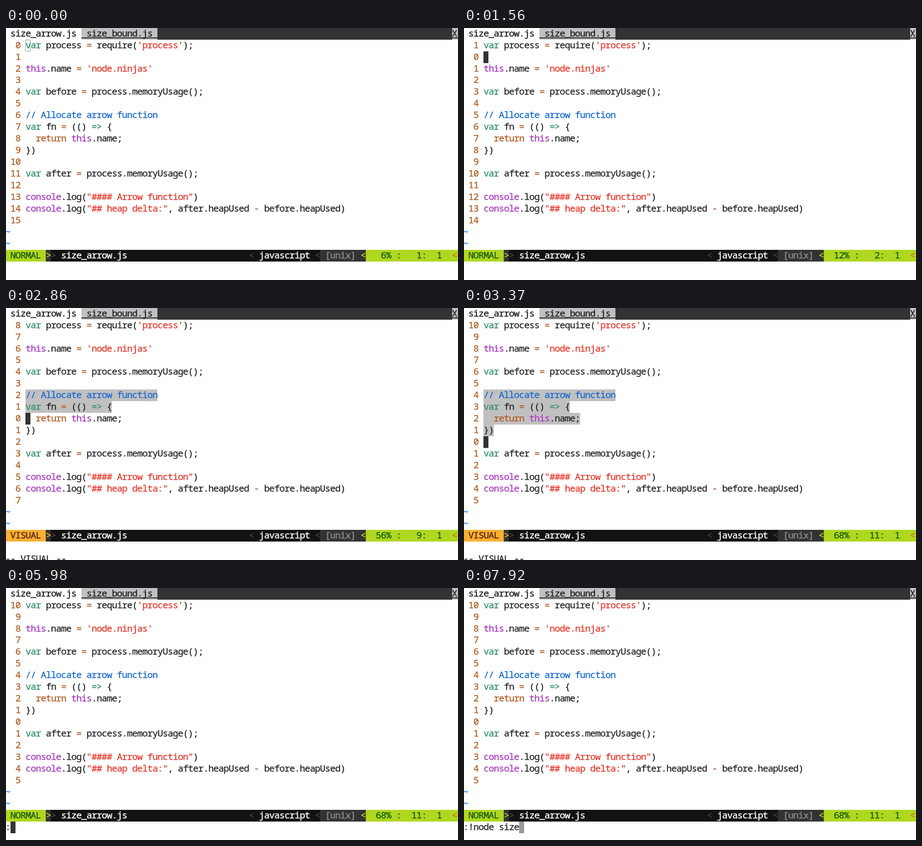
Animation, 1000 px wide and 560 px high, one loop 8 s. Source, as an HTML page:

```html
<!DOCTYPE html>
<html lang="en">
<head>
<meta charset="utf-8">
<title>Editor session</title>
<style>
  html, body { margin: 0; width: 100%; height: 100%; overflow: hidden; background: #fff; }
  #stage {
    position: relative; width: 1000px; height: 560px; overflow: hidden;
    font: 20.5px/22px "Noto Sans Mono", "DejaVu Sans Mono", monospace;
    letter-spacing: calc(11.23px - 1ch);
    -webkit-text-stroke: 0.3px;
    color: #222;
  }
  #stage div { position: absolute; height: 26px; white-space: pre; }
  .kw { color: #2f8f63; }
  .id { color: #a838c4; }
  .str { color: #e8372a; }
  .op, .num { color: #b05a1e; }
  .note { color: #1468d2; }
  .tilde { color: #2478f0; }
  .strong { font-weight: 500; -webkit-text-stroke: 0.45px; }
  .line { text-decoration: underline 2px; text-underline-offset: 2px; text-decoration-skip-ink: none; }
  .lime { background: #afd720; color: #1c5f04; }
  .amber { background: #f8b034; color: #5a2200; }
  .black { background: #121212; color: #fff; }
  .dark { background: #333; color: #8c8c8c; }
  .faint { color: #484848; }
  .sel { background: #c0c0c0; }
</style>
</head>
<body>
<div id="stage"></div>
<script>
const LOOP = 8000, CELL = 11.23, LEFT = -1.7, ROW = 25.95, TOP = -0.35;
const DARK = '#333', GREY = '#999', GREEN = '#2f8f63', PURPLE = '#a838c4', BLUE = '#1468d2';
const CODE = `var process = require('process');

this.name = 'node.ninjas'

var before = process.memoryUsage();

// Allocate arrow function
var fn = (() => {
  return this.name;
})

var after = process.memoryUsage();

console.log("#### Arrow function")
console.log("## heap delta:", after.heapUsed - before.heapUsed)
`.split('\n');
const ANCHOR = 7, CODE_COL = 4;

// start, cursor line, mode, command line
const STEPS = [
  [0, 1, 'idle'],
  [150, 1, 'NORMAL'],
  [1560, 2, 'NORMAL'],
  [1850, 3, 'NORMAL'],
  [2030, 5, 'NORMAL'],
  [2210, 7, 'NORMAL'],
  [2690, 8, 'VISUAL'],
  [2860, 9, 'VISUAL'],
  [3040, 10, 'VISUAL'],
  [3370, 11, 'VISUAL'],
  [4600, 11, 'NORMAL'],
  [5980, 11, 'NORMAL', ':'],
  [6130, 11, 'NORMAL', ':!'],
  [7170, 11, 'NORMAL', ':!no'],
  [7320, 11, 'NORMAL', ':!nod'],
  [7470, 11, 'NORMAL', ':!node '],
  [7620, 11, 'NORMAL', ':!node s'],
  [7770, 11, 'NORMAL', ':!node siz'],
  [7920, 11, 'NORMAL', ':!node size']
];

const stage = document.getElementById('stage');

function place(el, row, col) {
  el.style.left = LEFT + col * CELL + 'px';
  el.style.top = Math.round(TOP + row * ROW) + 'px';
}

function add(row, col, text = '', cls = '', cols = 0) {
  const el = document.createElement('div');
  el.className = cls;
  el.textContent = text;
  if (cols) el.style.width = cols * CELL + 'px';
  place(el, row, col);
  return stage.appendChild(el);
}

function show(el, on) {
  el.style.visibility = on ? 'visible' : 'hidden';
}

function highlight(text) {
  const classes = ['note', 'str', 'kw', 'id', 'op'];
  const token = /(\/\/.*)|('[^']*'|"[^"]*")|(\bvar\b|=>)|(\bthis\b|\bconsole\b)|(\breturn\b|[=-])/g;
  return text.replace(token, (match, ...groups) => {
    const kind = classes[groups.slice(0, 5).findIndex(Boolean)];
    return `<span class="${kind}">${match}</span>`;
  });
}

// Tab bar
add(0, 0, '', 'dark', 90);
add(0, 0, ' size_arrow.js', 'strong', 15).style.background = '#fff';
add(0, 15, ' size_bound.js ', 'sel strong line', 15);
add(0, 88, 'X ', 'sel strong line', 2);

// Buffer
const marks = CODE.map((text, i) => add(i + 1, CODE_COL, '', 'sel', text.length));
const numbers = CODE.map((_, i) => add(i + 1, 1, '', 'num'));
CODE.forEach((text, i) => { add(i + 1, CODE_COL).innerHTML = highlight(text); });
add(17, 0, '~', 'tilde');
add(18, 0, '~', 'tilde');

// Status line
add(19, 0, '', 'black', 90);
const modeBox = add(19, 0, '', '', 8);
const modeArrow = add(19, 8, '>', 'dark strong', 1);
add(19, 9, '>', 'faint');
add(19, 11, 'size_arrow.js', 'black strong');
add(19, 48, '<', 'faint');
add(19, 50, 'javascript', 'black strong');
add(19, 61, '<', 'faint');
add(19, 62, ' [unix]', 'dark strong', 9);
add(19, 70, '<', 'strong').style.color = '#afd720';
const ruler = add(19, 71, '', 'lime strong', 19);
add(19, 88, '<', 'strong').style.color = '#d8701c';

const command = add(20, 0);
const message = add(21, 0, '-- VISUAL --');
const cursor = add(1, CODE_COL, '', '', 1);

function cursorColor(text) {
  if (text.startsWith('var')) return GREEN;
  if (text.startsWith('this')) return PURPLE;
  return text.startsWith('//') ? BLUE : DARK;
}

function drawCursor(line, idle, typed) {
  const text = CODE[line - 1];
  const color = typed ? (typed.endsWith('size') ? GREY : DARK) : cursorColor(text);
  if (typed) place(cursor, 20, typed.length);
  else place(cursor, line, CODE_COL);
  cursor.textContent = typed ? '' : text.charAt(0);
  cursor.style.background = idle ? '#fff' : color;
  cursor.style.color = idle ? color : '#fff';
  cursor.style.boxShadow = idle ? 'inset 0 0 0 1px #6f9c85' : 'none';
}

function draw([, line, mode, typed = '']) {
  const visual = mode === 'VISUAL';
  numbers.forEach((el, i) => {
    const row = i + 1;
    el.textContent = String(Math.abs(row - line)).padStart(2);
    show(marks[i], visual && row >= ANCHOR && row < line);
  });
  modeBox.className = (visual ? 'amber' : 'lime') + ' strong';
  modeBox.textContent = visual ? ' VISUAL' : ' NORMAL';
  modeArrow.style.color = visual ? '#f8b034' : '#afd720';
  const percent = Math.floor(100 * line / CODE.length);
  ruler.textContent = `  ${String(percent).padStart(2)}% : ${String(line).padStart(3)}:  1`;
  show(message, visual);
  command.textContent = typed;
  drawCursor(line, mode === 'idle', typed);
}

let shown;
function tick() {
  const t = performance.now() % LOOP;
  const step = STEPS.findLast(s => s[0] <= t);
  if (step !== shown) draw(shown = step);
  requestAnimationFrame(tick);
}
tick();
</script>
</body>
</html>
```
